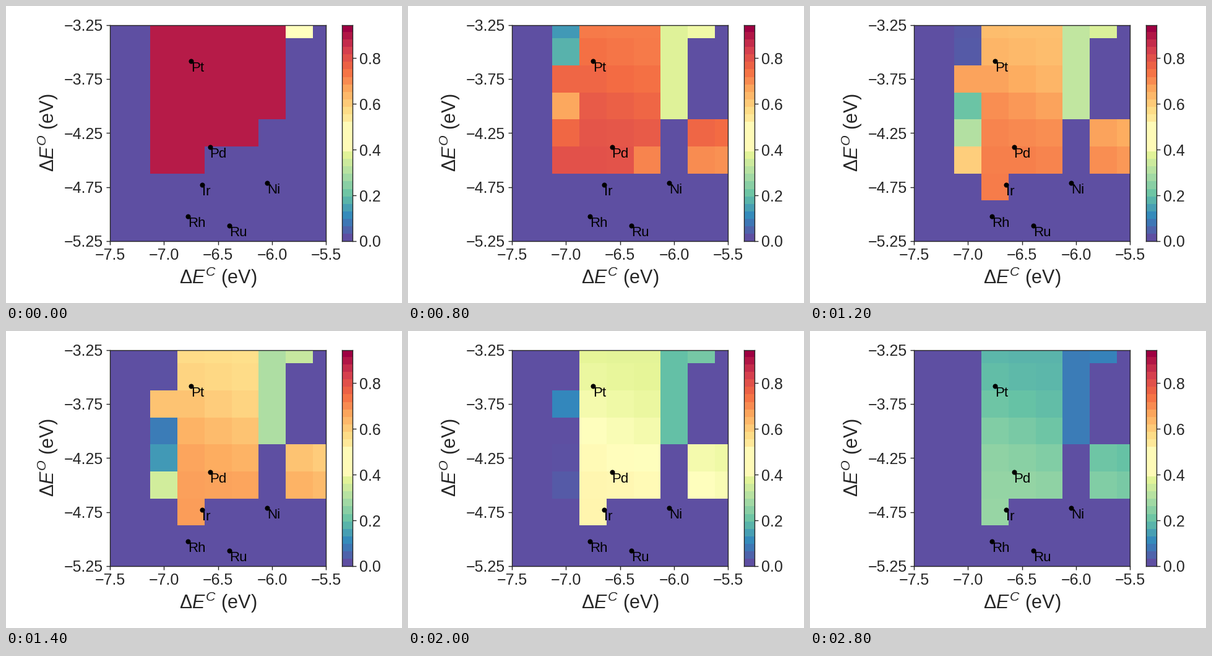
A matplotlib script that plays this animation: 640 by 480 pixels, repeating every 3000 ms.

```python
import matplotlib.pyplot as plt
import numpy as np
from matplotlib.animation import FuncAnimation
from matplotlib.colors import ListedColormap

W, H, DPI = 640, 480, 100
FRAMES, STEP = 15, 200
INK = "#262626"
VMAX = 0.946      # top of the colour scale
FULL = 0.955      # share of VMAX in the saturated opening state
BANDS = 29

plt.rcParams.update({
    "font.family": "Liberation Sans",
    "mathtext.fontset": "custom",
    "mathtext.it": "Liberation Sans:italic",
    "mathtext.rm": "Liberation Sans",
    "axes.edgecolor": INK,
    "axes.linewidth": 1.0,
})

METALS = {
    "Pt": (-6.75, -3.585), "Pd": (-6.575, -4.38), "Ir": (-6.645, -4.73),
    "Ni": (-6.045, -4.71), "Rh": (-6.78, -5.02), "Ru": (-6.395, -5.105),
}

# Frame at which each row of the left edge column empties, from the top
EDGE_DROP = np.array([2.3, 2.6, 8, 4.8, 5.3, 6.5])

ROW, COL = np.mgrid[:9, :9]


def decay(i, centre, width):
    return 1 / (1 + np.exp((i - centre) / width))


def start_frames():
    """Frame at which each cell of the main region switches on."""
    start = np.full((9, 9), np.inf)
    start[:6, 3:6] = 0
    start[4, 7:] = start[5, 4] = 1
    start[5, 5] = start[5, 7:] = 4
    start[6, 3] = 5
    return start


START = start_frames()
# Cells further down, and nearer the left, hold their coverage longer
HOLD = 1 - decay(ROW, 2.2 + 0.5 * (COL - 3), 0.9)


def coverage(i):
    main = decay(i, 8.4 + 2.1 * HOLD, 3.6)
    fresh = np.where((START == i) & (ROW > 4), 0.9, 1)
    z = np.where(START <= i, main * fresh, 0)
    z[:6, 2] = np.minimum(main[:6, 3], decay(i, EDGE_DROP, 0.9))
    side = decay(i, 9, 3.2)
    z[:4, 6] = 0.47 * side
    if i == 0:
        z[z > 0] = FULL
    z[0, 7] = 0.53 * side
    return z * VMAX


def place(left, top, right, bottom):
    return fig.add_axes([left / W, 1 - bottom / H,
                         (right - left) / W, (bottom - top) / H])


def style_ticks(axis, values, digits):
    labels = [f"{v:.{digits}f}".replace("-", "\u2212") for v in values]
    axis.set_ticks(values, labels)
    axis.set_tick_params(length=4.3, width=1.0, pad=3.5, labelsize=18,
                         color=INK, labelcolor=INK)


def axis_label(x, y, element, rotation=0):
    fig.text(x / W, 1 - y / H, rf"$\Delta E^{element}$ (eV)", fontsize=22,
             color=INK, rotation=rotation, rotation_mode="anchor",
             ha="center", va="baseline")


def banded_map():
    cmap = plt.get_cmap("Spectral_r")
    shades = cmap(np.linspace(0, 1, BANDS))
    shades[12:16] = cmap(0.515)
    return ListedColormap(shades)


fig = plt.figure(figsize=(W / DPI, H / DPI), dpi=DPI, facecolor="white")

ax = place(167.97, 30.55, 517.37, 379.95)
mesh = ax.pcolormesh(np.linspace(-7.625, -5.375, 10),
                     np.linspace(-3.125, -5.375, 10), coverage(0),
                     cmap="Spectral_r", vmin=0, vmax=VMAX)
ax.set(xlim=(-7.5, -5.5), ylim=(-5.25, -3.25))
style_ticks(ax.xaxis, np.arange(-7.5, -5.4, 0.5), 1)
style_ticks(ax.yaxis, np.arange(-5.25, -3.2, 0.5), 2)

for name, (x, y) in METALS.items():
    ax.plot(x, y, "o", color="black", ms=5.8, mew=0)
    ax.annotate(name, (x, y), xytext=(0, -12.2), textcoords="offset points",
                fontsize=16, color="black", va="baseline")

bar = place(542.9, 30.55, 560.3, 379.95)
bar.imshow(np.arange(BANDS)[:, None], cmap=banded_map(), origin="lower",
           extent=(0, 1, 0, VMAX), interpolation="nearest", aspect="auto")
bar.set_xticks([])
bar.yaxis.tick_right()
style_ticks(bar.yaxis, np.arange(0, 0.9, 0.2), 1)

axis_label(343, 448.5, "C")
axis_label(78, 205, "O", rotation=90)


def update(i):
    mesh.set_array(coverage(i))
    return [mesh]


anim = FuncAnimation(fig, update, frames=FRAMES, interval=STEP,
                     repeat=True, repeat_delay=0, blit=False)
plt.show()
```
